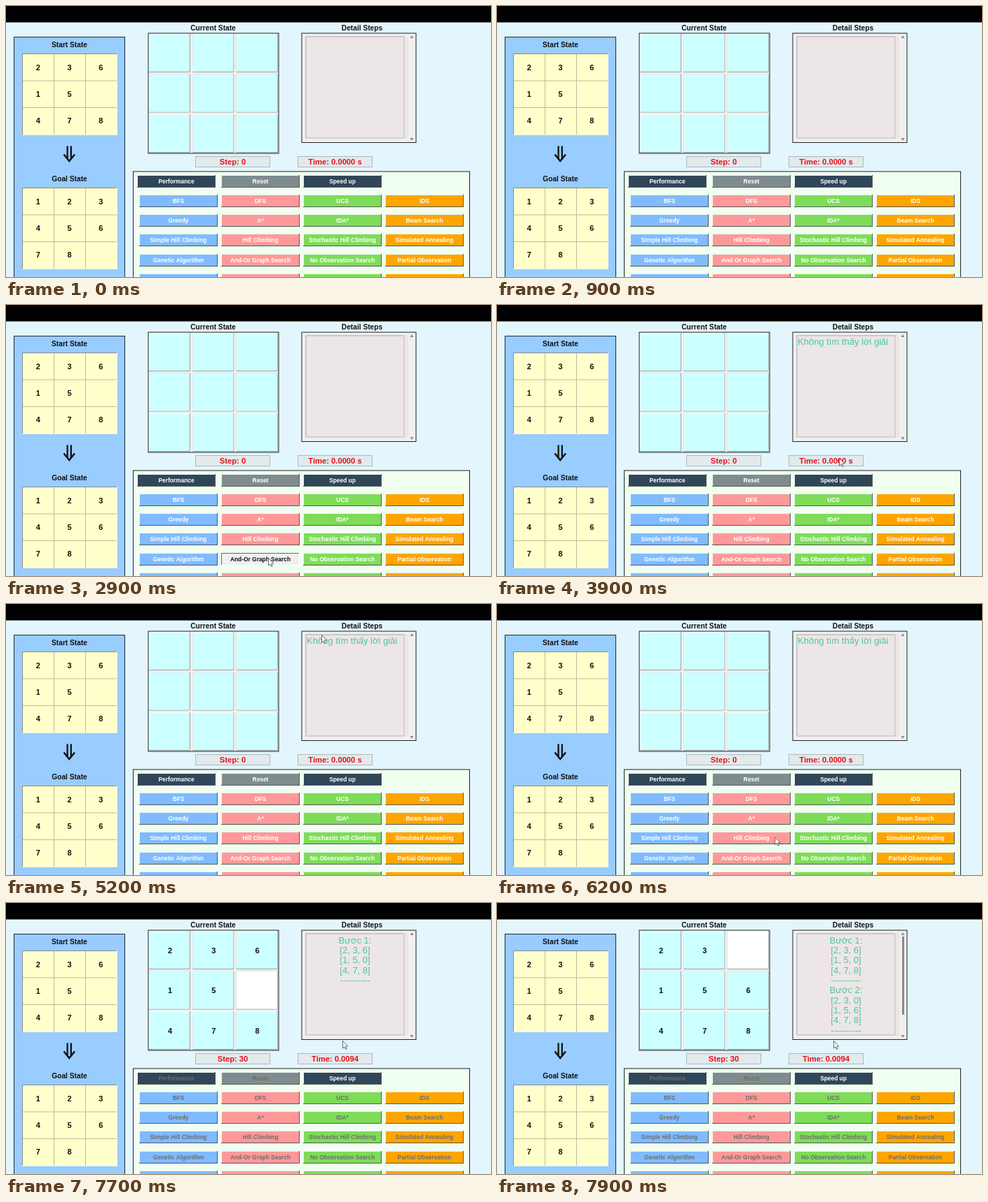
Write an HTML page with a canvas that moves like this. It is 692 px wide and 388 px high and loops after 8000 ms.

```html
<!DOCTYPE html>
<html lang="en">
<head>
<meta charset="utf-8">
<title>8-puzzle search</title>
<style>
  html, body { margin: 0; width: 100%; height: 100%; overflow: hidden; background: #e3f5fd; }
  canvas { display: block; width: 692px; height: 388px; }
</style>
</head>
<body>
<canvas id="stage" width="692" height="388"></canvas>
<script>
const ctx = document.getElementById('stage').getContext('2d');
const LOOP = 8000;
const START = '236150478', GOAL = '123456780';
const SLID = swap(START, '0', '6');
const COLUMNS = [
  { color: '#80bbff', names: ['BFS', 'Greedy', 'Simple Hill Climbing', 'Genetic Algorithm', ''] },
  { color: '#ff9999', names: ['DFS', 'A*', 'Hill Climbing', 'And-Or Graph Search', ''] },
  { color: '#7edc58', names: ['UCS', 'IDA*', 'Stochastic Hill Climbing', 'No Observation Search', ''] },
  { color: '#ffa500', names: ['IDS', 'Beam Search', 'Simulated Annealing', 'Partial Observation', ''] },
];
const ENTRY = { x: 376, y: 386 }, BUTTON = { x: 374, y: 362 }, TIMER = { x: 488, y: 219 };
const MESSAGE = { x: 450, y: 44 }, MESSAGE_END = { x: 588, y: 88 }, REST = { x: 480, y: 197 };
// Each move eases from the previous place; sway swings it sideways on the way.
const MOVES = [
  { start: 1900, end: 2100, to: BUTTON },
  { start: 2900, end: 3300, to: TIMER },
  { start: 4300, end: 5200, to: MESSAGE, sway: 145 },
  { start: 5200, end: 5600, to: MESSAGE_END },
  { start: 5800, end: 6300, to: BUTTON },
  { start: 6700, end: 7100, to: REST },
];

function swap(text, a, b) {
  return [...text].map(ch => ch === a ? b : ch === b ? a : ch).join('');
}

function fill(x, y, w, h, color) {
  ctx.fillStyle = color;
  ctx.fillRect(x, y, w, h);
}

function frame(x, y, w, h, color, background) {
  fill(x, y, w, h, color);
  fill(x + 1, y + 1, w - 2, h - 2, background);
}

function bevel(x, y, w, h, background, light, dark) {
  fill(x, y, w, h, dark);
  fill(x, y, w - 1, h - 1, light);
  fill(x + 1, y + 1, w - 2, h - 2, background);
}

function trace(points) {
  ctx.beginPath();
  points.forEach(([x, y]) => ctx.lineTo(x, y));
}

function line(points, color, width) {
  trace(points);
  ctx.strokeStyle = color;
  ctx.lineWidth = width;
  ctx.stroke();
}

function polygon(points, color) {
  trace(points);
  ctx.fillStyle = color;
  ctx.fill();
}

// Text with its capitals centred on y
function label(text, x, y, size, color = '#111', weight = 'bold', align = 'center') {
  ctx.font = `${weight} ${size}px "Liberation Sans", Arial, sans-serif`;
  ctx.textAlign = align;
  ctx.fillStyle = color;
  ctx.fillText(text, x, y + size * 0.36);
}

function eachTile(state, paint) {
  [...state].forEach((digit, i) => paint(digit, i % 3, Math.floor(i / 3)));
}

function smallGrid(state, top) {
  bevel(23, top, 136, 117, '#ffffcc', '#8c8c84', '#f4f4e8');
  for (const i of [1, 2]) {
    fill(23 + 45 * i, top + 1, 1, 115, '#bcbc9e');
    fill(24, top + 38.5 * i, 134, 1, '#bcbc9e');
  }
  eachTile(state, (digit, column, row) => {
    if (digit !== '0') label(digit, 45.7 + 44.8 * column, top + 20 + 38.2 * row, 11);
  });
}

function leftPanel() {
  frame(11, 44, 159, 350, '#1c2a3c', '#99ccff');
  label('Start State', 90.5, 55.5, 10.2);
  label('Goal State', 90.5, 247.5, 10.2);
  smallGrid(START, 68);
  smallGrid(GOAL, 260);
  for (const x of [87.6, 92.8]) line([[x, 200.5], [x, 219]], '#111', 2.3);
  line([[82.5, 212.5], [90.2, 222], [98, 212.5]], '#111', 2.4);
}

function board(state) {
  label('Current State', 295.5, 31, 10.2);
  frame(202.5, 38.5, 187, 173, '#222', '#f0f0f0');
  eachTile(state, (digit, column, row) => {
    const x = 204 + 62.3 * column, y = 40 + 57.5 * row;
    bevel(x, y, 59, 55, digit === '0' ? '#ffffff' : '#ccffff', '#f8ffff', '#98a4a4');
    label(digit === '0' ? '' : digit, x + 30, y + 28, 11);
  });
}

function details(failed, steps) {
  label('Detail Steps', 508, 31, 10.2);
  frame(421.5, 38.5, 164, 157.5, '#222', '#f0f0f0');
  fill(427, 43, 147, 147, '#ede6e6');
  bevel(427.5, 43.5, 141, 146, '#ede6e6', '#b8b4b4', '#c0bcbc');
  polygon([[576.5, 46], [581.5, 46], [579, 42]], '#8c8c8c');
  polygon([[576.5, 189], [581.5, 189], [579, 193]], '#8c8c8c');
  if (failed) label('Không tìm thấy lời giải', 429, 52.5, 13, '#4ac79c', 'normal', 'left');
  const lines = steps.flatMap((state, i) => [
    `Bước ${i + 1}:`,
    ...state.match(/.../g).map(row => `[${[...row].join(', ')}]`),
    '----------',
  ]);
  lines.forEach((text, i) => label(text, 498, 53 + 14.35 * i, 13, '#4ac79c', 'normal'));
  if (steps.length > 1) fill(578, 48, 3, 112, '#8a8a8a');
}

function counter(x, text) {
  frame(x, 215, 107, 16, '#b2b8ba', '#e2eaec');
  label(text, x + 53.5, 223, 11.2, '#e3101c');
}

function button(x, y, text, color, textColor, pressed) {
  if (pressed) bevel(x, y, 112, 18, '#f0f0f0', '#696969', '#ffffff');
  else bevel(x, y, 112, 18, color, '#eef4f4', '#55595c');
  label(text, x + 56, y + 9.2, 8.4, pressed ? '#111' : textColor);
}

function controls(pressed, disabled) {
  const textColor = disabled ? '#6d6d6d' : '#ffffff';
  frame(181, 236.5, 481, 160, '#222', '#f0fff0');
  button(187, 242, 'Performance', '#304659', textColor);
  button(307, 242, 'Reset', '#7f8c8d', textColor);
  button(424, 242, 'Speed up', '#304659', '#ffffff');
  COLUMNS.forEach(({ color, names }, column) => names.forEach((name, row) =>
    button(190 + 117 * column, Math.round(270.2 + 28.1 * row), name, color, textColor,
      pressed && name === 'And-Or Graph Search')));
}

function pointer(t) {
  if (t < MOVES[0].start) return;
  let { x, y } = ENTRY;
  for (const { start, end, to, sway = 0 } of MOVES) {
    const k = Math.min(1, Math.max(0, (t - start) / (end - start)));
    const ease = k * k * (3 - 2 * k);
    x += (to.x - x) * ease + sway * Math.sin(2 * Math.PI * k) * (1 - k);
    y += (to.y - y) * ease;
  }
  const shape = [[0, 0], [0, 10.5], [2.4, 8.4], [4, 12], [5.6, 11.3], [4.1, 7.8], [7.2, 7.5], [0, 0]]
    .map(([dx, dy]) => [x + 0.5 + dx, y + 0.5 + dy]);
  polygon(shape, '#ffffff');
  line(shape, '#444', 0.8);
}

function draw(now) {
  const t = Math.floor(now % LOOP / 100) * 100;
  const pressed = (t >= 2800 && t < 3900) || (t >= 6700 && t < 7700);
  const solving = t >= 7700;
  const steps = solving ? [START, SLID].slice(0, t < 7900 ? 1 : 2) : [];

  fill(0, 0, 692, 388, '#e3f5fd');
  fill(0, 0, 692, 23.5, '#000000');
  leftPanel();
  // Before a solution the board shows nine blank blue tiles.
  board(steps.length ? steps[steps.length - 1] : ' '.repeat(9));
  details(t >= 3900 && !solving, steps);
  counter(270, solving ? 'Step: 30' : 'Step: 0');
  counter(416, solving ? 'Time: 0.0094' : 'Time: 0.0000 s');
  controls(pressed, solving);
  pointer(t);
  requestAnimationFrame(draw);
}
requestAnimationFrame(draw);
</script>
</body>
</html>
```
